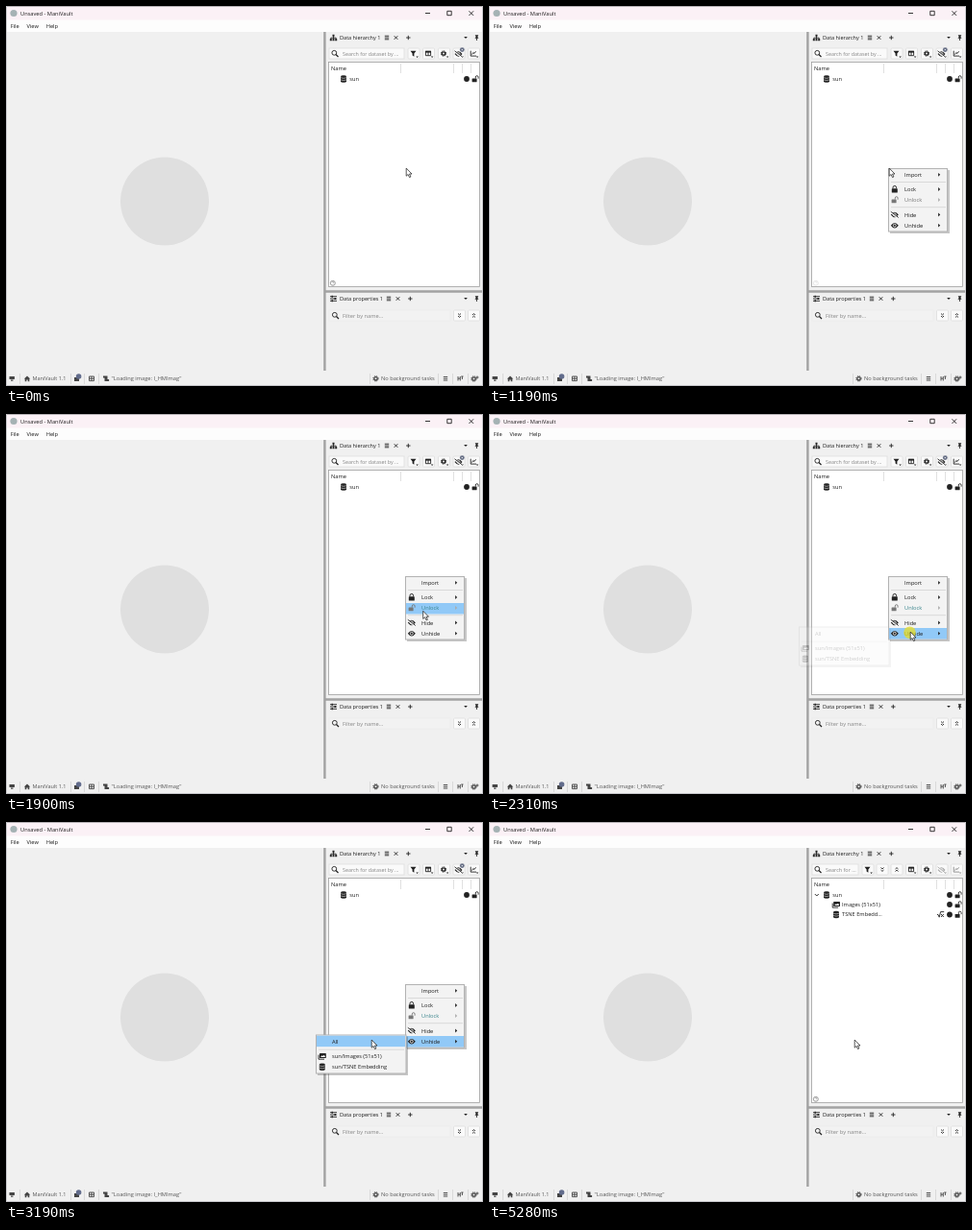
Animation of 496x396 px, one loop 5480 ms. Source, as an HTML page:

```html
<!DOCTYPE html>
<html lang="en">
<head>
<meta charset="utf-8">
<title>Unhide datasets</title>
<style>
  html, body { margin: 0; width: 100%; height: 100%; overflow: hidden; background: #f0f0f0; }
  svg { display: block; color: #222; }
  text { font: 5.7px "Open Sans", "Noto Sans", sans-serif; fill: #1c1c1c; white-space: pre; }
  .dim { fill: #858585; }
  .status { fill: #555; }
  .line { fill: none; stroke: currentColor; stroke-width: .9; }
  .rule { fill: none; stroke: #d9d9d9; }
  .box { fill: #fafafa; stroke: #dedede; stroke-width: .8; }
  .popup { fill: #f3f3f3; stroke: #b2b2b2; }
  .shadow { fill: #000; opacity: .22; }
  .hover { fill: #91c9f7; }
  .off { color: #8c8c8c; }
</style>
</head>
<body>
<svg width="496" height="396" viewBox="0 0 496 396">
  <defs>
    <g id="db" fill="currentColor"><path d="M-3-2.5a3 1.2 0 0 1 6 0v5a3 1.2 0 0 1-6 0z"/><path d="M-3-1.3q3 1.3 6 0M-3 1q3 1.3 6 0" fill="none" stroke="#fff" stroke-width=".5"/></g>
    <g id="lock"><rect x="-3" y="-.7" width="6" height="4.2" rx=".6" fill="currentColor"/><path class="line" d="M-1.8-.5v-1.3a1.8 1.8 0 0 1 3.6 0v1.3"/></g>
    <g id="unlock"><rect x="-3.4" y="-.6" width="5" height="3.9" rx=".6" fill="currentColor"/><path class="line" d="M.3-.5v-1.4a1.4 1.4 0 0 1 2.8 0v1.6"/></g>
    <g id="eye"><path d="M-4 0Q0-5.4 4 0Q0 5.4-4 0z" fill="currentColor"/><circle r="1.5" fill="none" stroke="#fff" stroke-width=".8"/></g>
    <g id="hidden"><use href="#eye"/><path d="M-4-2.4L4 3.4" stroke="#fff" stroke-width="1.8"/><path class="line" d="M-4-3.2L4 3"/></g>
    <path id="filter" d="M-3-2.8h6L.9.1v3.1L-.9 2V.1z" fill="currentColor"/>
    <g id="columns"><path class="line" d="M-2.6-2.2h5.2v4.4h-5.2zM0-2v4"/><path d="M-3-2.7h6v1.8h-6z" fill="currentColor"/></g>
    <g id="gear" class="line"><circle r="1.7" stroke-width="1.3"/><circle r="2.7" stroke-width="1" stroke-dasharray="1.1 1.02"/></g>
    <path id="chart" class="line" d="M-2.8-2.8v5.4h5.8M-1.5 1l1.3-2 1.2 1 1.6-2.2"/>
    <path id="expand" class="line" d="M-1.5-2l1.5 1.4 1.5-1.4M-1.5.5L0 1.9 1.5.5"/>
    <path id="collapse" class="line" d="M-1.5-.5L0-1.9 1.5-.5M-1.5 2L0 .6 1.5 2"/>
    <g id="search" class="line"><circle cx="-.7" cy="-.7" r="2.4"/><path d="M1 1l2.5 2.5" stroke-width="1.3"/></g>
    <path id="list" class="line" d="M-2.2-1.8h4.4M-2.2 0h4.4M-2.2 1.8h4.4"/>
    <path id="cross" class="line" d="M-1.8-1.8l3.6 3.6M1.8-1.8l-3.6 3.6"/>
    <path id="plus" class="line" d="M-2.2 0h4.4M0-2.2v4.4" stroke-width="1.1"/>
    <path id="caret" d="M-1.9-.9h3.8L0 1.1z" fill="currentColor"/>
    <path id="more" d="M-.9-1.9v3.8L1.2 0z" fill="currentColor"/>
    <path id="pin" d="M-1.6-2.8h3.2v.8h-.5v1.8l1 .9h-1.7v2.2h-.8V.7h-1.7l1-.9V-2h-.5z" fill="currentColor"/>
    <g id="images"><path d="M-3.8-1.4v4.6h6" class="line"/><rect x="-2.8" y="-3" width="6.8" height="5" rx=".6" fill="currentColor"/><path d="M-1.8 1.1L0-.7l.8.6L2-1.3l1.2 2.4z" fill="#fff"/></g>
    <g id="button"><rect class="box" x="-6" y="-5.5" width="12" height="11" rx="1"/></g>
    <g id="drop"><use href="#button"/><path d="M2.3 3h2.6l-1.3 1.5z" fill="currentColor"/></g>
    <g id="tabTools"><use href="#list"/><use href="#cross" x="9.5"/><use href="#plus" x="22.3"/></g>
  </defs>

  <rect width="496" height="396" fill="#f0f0f0"/>
  <rect width="496" height="15" fill="#fbf1f6"/>
  <rect y="14.5" width="496" height="12.5" fill="#fdfdfd"/>
  <path d="M0 .5H496" stroke="#b9b4b8"/>
  <path d="M.5 0V396M495.5 0V396" stroke="#c8c8cc"/>
  <path d="M0 395.5H496" stroke="#c8c8cc"/>
  <circle cx="8" cy="7.5" r="3.6" fill="#a5b2b4"/>
  <text x="15" y="9.8">Unsaved - ManiVault</text>
  <path class="line" d="M436 7.5h5M458.8 5.3h4.4v4.4h-4.4zM481.5 5.3l4.6 4.6M486.1 5.3l-4.6 4.6"/>
  <text x="4.7" y="22.8">File</text><text x="21.5" y="22.8">View</text><text x="41.7" y="22.8">Help</text>

  <circle cx="165" cy="203.5" r="46" fill="#dfdfdf"/>
  <path d="M331.4 27V380" stroke="#a2a2a2" stroke-width="2.4"/>
  <path d="M332 297.5H495" stroke="#a2a2a2" stroke-width="2.4"/>

  <path d="M340-0" />
  <g transform="translate(340.5 33)"><path class="line" d="M0-2v2M-2.7 2V.2h5.4V2M0 0v2"/><path d="M-1-3.3h2v2h-2zM-3.7 1.3h2v2h-2zM-1 1.3h2v2h-2zM1.7 1.3h2v2h-2z" fill="currentColor"/></g>
  <text x="347" y="35.1" style="font-size:5.55px">Data hierarchy 1</text>
  <use href="#tabTools" x="396" y="33"/><use href="#caret" x="478" y="33"/><use href="#pin" x="489.5" y="33"/>

  <g id="toolsBefore">
    <rect class="box" x="336" y="44" width="78" height="11" fill="#fff"/>
    <use href="#search" x="342" y="49.5"/><text class="dim" x="350" y="51.7" style="font-size:5.35px">Search for dataset by ...</text>
    <use href="#drop" x="424" y="49.5"/><use href="#filter" x="423.5" y="49.5"/>
    <use href="#drop" x="471" y="49.5"/><use href="#hidden" x="470.5" y="50"/>
    <circle cx="474.3" cy="45.6" r="2.4" fill="#687086"/><circle cx="474.3" cy="45.6" r=".7" fill="#fff"/>
    <use href="#drop" x="486.5" y="49.5"/><use href="#chart" x="486" y="49.5"/>
  </g>
  <g id="toolsAfter">
    <rect class="box" x="336" y="44" width="48" height="11" fill="#fff"/>
    <use href="#search" x="342" y="49.5"/><text class="dim" x="350" y="51.7" style="font-size:5.45px">Search for ...</text>
    <use href="#drop" x="394" y="49.5"/><use href="#filter" x="393.5" y="49.5"/>
    <use href="#button" x="409" y="49.5"/><use href="#expand" x="409" y="49.5"/>
    <use href="#button" x="424" y="49.5"/><use href="#collapse" x="424" y="49.5"/>
    <g class="off"><use href="#drop" x="471" y="49.5"/><use href="#hidden" x="470.5" y="50" opacity=".75"/>
    <use href="#drop" x="486.5" y="49.5"/><use href="#chart" x="486" y="49.5"/></g>
  </g>
  <use href="#drop" x="439.5" y="49.5"/><use href="#columns" x="439" y="49.5"/>
  <use href="#drop" x="455.5" y="49.5"/><use href="#gear" x="455" y="49.5"/>

  <rect x="335.5" y="58.5" width="157" height="234" fill="#fff" stroke="#a0a0a0" stroke-width=".8"/>
  <path class="rule" d="M410.5 60v10M465.5 60v10M474.5 60v10M483.5 60v10" stroke-width=".8"/>
  <text x="338" y="67.4">Name</text>
  <use href="#db" x="351" y="76"/><text x="357.3" y="78">sun</text>
  <circle cx="479" cy="76" r="2.9" fill="#222"/><use href="#unlock" x="488" y="76"/>
  <g id="children">
    <path class="line" d="M338.8 75l2 2 2-2"/>
    <use href="#images" x="361" y="86"/><text x="367" y="88">Images (51x51)</text>
    <circle cx="479" cy="86" r="2.9" fill="#222"/><use href="#unlock" x="488" y="86"/>
    <use href="#db" x="361" y="96.5"/><text x="367" y="98.3">TSNE Embedd...</text>
    <path class="line" d="M466 96.5h1l1.2 2.7 1.4-5.6h3.6M470 96l2.8 3M472.8 96l-2.8 3"/>
    <circle cx="479" cy="96.5" r="2.9" fill="#222"/><use href="#unlock" x="488" y="96.5"/>
  </g>
  <g id="help"><circle cx="339.8" cy="288.8" r="2.5" fill="none" stroke="#858585" stroke-width=".8"/><path d="M338.9 288.3q.2-1 1-.9t.9.9l-.9.8M339.9 290v.5" fill="none" stroke="#858585" stroke-width=".6"/></g>

  <g transform="translate(340.5 305)"><path class="line" d="M-3.5-2.3h7M-3.5 0h7M-3.5 2.3h7"/><path d="M-2-3.3h1.4v2H-2zM1-1h1.4v2H1zM-2 1.3h1.4v2H-2z" fill="currentColor"/></g>
  <text x="347" y="307.1" style="font-size:5.55px">Data properties 1</text>
  <use href="#tabTools" x="398" y="305"/><use href="#caret" x="478" y="305"/><use href="#pin" x="489.5" y="305"/>
  <rect class="box" x="336" y="317" width="126" height="11" style="fill:#f2f2f2;stroke:#ececec"/>
  <use href="#search" x="342.5" y="322.5"/><text class="dim" x="350" y="324.8">Filter by name...</text>
  <use href="#button" x="471.5" y="322.5"/><use href="#expand" x="471.5" y="322.5"/>
  <use href="#button" x="486.5" y="322.5"/><use href="#collapse" x="486.5" y="322.5"/>

  <g color="#444">
    <path class="rule" d="M14.5 383v11M67.5 383v11M81.5 383v11M96.5 383v11M378.5 383v11M449.5 383v11M464.5 383v11M480.5 383v11"/>
    <path d="M3.5 386h5.4v3H3.5zM5 389.6h2.4v1.2H5z" fill="currentColor"/>
    <path d="M18.8 388.4l3.2-3 3.2 3h-.9v2.8h-1.6v-1.8h-1.4v1.8h-1.6v-2.8z" fill="currentColor"/>
    <text class="status" x="27.5" y="390.4" style="font-size:5.5px">ManiVault 1.1</text>
    <path d="M71 387h5v4h-5z" fill="currentColor"/><circle cx="75.6" cy="386" r="2.8" fill="#626c8c"/>
    <path class="line" d="M86.5 386h5v4.6h-5zM86.5 388.3h5M89 386v4.6"/>
    <path d="M101 385.5h4.5v3.5h1.6v2h-4.6v-3.5H101z" fill="currentColor"/>
    <text class="status" x="109.5" y="390.4">"Loading image: I_HMImag"</text>
    <use href="#gear" x="384.5" y="388.3"/><text class="status" x="390" y="390.4">No background tasks</text>
    <use href="#list" x="457" y="388.3"/>
    <path class="line" d="M470 386v4.5M470 388.2h2.2M472.3 386v4.5M473.3 386h2.2M474.4 386v3"/>
    <use href="#gear" x="486.5" y="388.5"/><circle class="line" cx="490" cy="387" r="1"/>
  </g>

  <g id="menu">
    <rect class="shadow" x="417" y="171" width="62" height="66"/>
    <rect class="popup" x="415.5" y="169.5" width="61" height="65.5"/>
    <path class="rule" d="M418 183.5h57M418 209.7h57"/>
    <rect id="menuHover" class="hover" x="416" width="60" height="11.5"/>
    <text x="432" y="178.1">Import</text>
    <use href="#lock" x="421.8" y="191"/><text x="432" y="193.1">Lock</text>
    <use href="#unlock" x="422" y="202" color="#777"/><text id="unlockLabel" x="432" y="204.3">Unlock</text>
    <use href="#hidden" x="421.8" y="217.5"/><text x="432" y="219.7">Hide</text>
    <use href="#eye" x="421.8" y="228.7"/><text x="432" y="230.9">Unhide</text>
    <use href="#more" x="468" y="175.8"/><use href="#more" x="468" y="191"/><use href="#more" x="468" y="202" color="#aaa"/>
    <use href="#more" x="468" y="217.5"/><use href="#more" x="468" y="228.7"/>
  </g>
  <g id="submenu">
    <rect class="shadow" x="324" y="223.5" width="94" height="40.5"/>
    <rect class="popup" x="322.5" y="222" width="93.5" height="40"/>
    <path class="rule" d="M325 237.2h89"/>
    <rect id="allHover" class="hover" x="323" y="222.7" width="92" height="11.5"/>
    <text x="339" y="230.9">All</text>
    <use href="#images" x="328.8" y="244"/><text x="339" y="246.2">sun/Images (51x51)</text>
    <use href="#db" x="328.8" y="255.3"/><text x="339" y="257.4">sun/TSNE Embedding</text>
  </g>
  <g id="cursor">
    <circle id="click" cx="-.5" cy=".7" r="6.3" fill="#e6dc2a" opacity=".78"/>
    <path d="M.2 0v8.2l1.9-1.7 1.4 3.1 1.4-.6-1.4-3h2.5z" fill="#fff" stroke="#222" stroke-width=".75"/>
  </g>
</svg>
<script>
const LOOP = 5480;
const part = Object.fromEntries([...document.querySelectorAll("svg > g[id], #menuHover, #unlockLabel, #allHover, #click")]
  .map(el => [el.id, el]));

// [time, value] pairs; each value holds until the next time
const tracks = {
  menu: [[0, 0], [990, .2], [1060, .5], [1120, .8], [1190, 1], [4860, 0]],
  submenu: [[0, 0], [2310, .2], [2380, .6], [2450, 1], [4860, 0]],
  click: [[0, 0], [790, .78], [990, 0], [2310, .78], [2450, 0], [4660, .78], [4860, 0]],
  help: [[0, 1], [990, .6], [1190, .25], [1330, 0], [5140, .5], [5280, 1]],
  children: [[0, 0], [4930, 1]],
  toolsBefore: [[0, 1], [5070, 0]],
  toolsAfter: [[0, 0], [5070, 1]]
};

// start, end, step count, from, to
const moves = [
  [1258, 1690, 6, [416, 169], [429, 181]],
  [1690, 1830, 2, [429, 181], [432, 198]],
  [1830, 2110, 4, [432, 198], [438, 227]],
  [2840, 3190, 5, [438, 227], [380, 227]]
];

// top and bottom of each menu row
const rows = [[170, 183], [185, 197], [197, 209], [211.5, 223], [223, 235]];

const held = (keys, t) => keys.findLast(([start]) => t >= start)[1];

function cursorAt(t) {
  const [start, end, steps, from, to] = moves.findLast(m => t >= m[0]) || moves[0];
  const progress = Math.min(1, Math.max(0, (t - start) / (end - start)));
  const k = Math.floor(progress * steps + 1e-6) / steps;
  return from.map((v, i) => v + (to[i] - v) * k);
}

function draw(t) {
  for (const id in tracks) part[id].setAttribute("opacity", held(tracks[id], t));

  const [x, y] = cursorAt(t);
  part.cursor.setAttribute("transform", `translate(${x} ${y})`);

  const row = rows.find(([top, bottom]) => y >= top && y < bottom);
  part.menuHover.setAttribute("opacity", row ? 1 : 0);
  if (row) part.menuHover.setAttribute("y", row[0]);
  part.allHover.setAttribute("opacity", x < 415 ? 1 : 0);
  part.unlockLabel.style.fill = t < 1830 ? "#777" : "#3b858c";
}

function tick() {
  draw(performance.now() % LOOP);
  requestAnimationFrame(tick);
}
tick();
</script>
</body>
</html>
```
